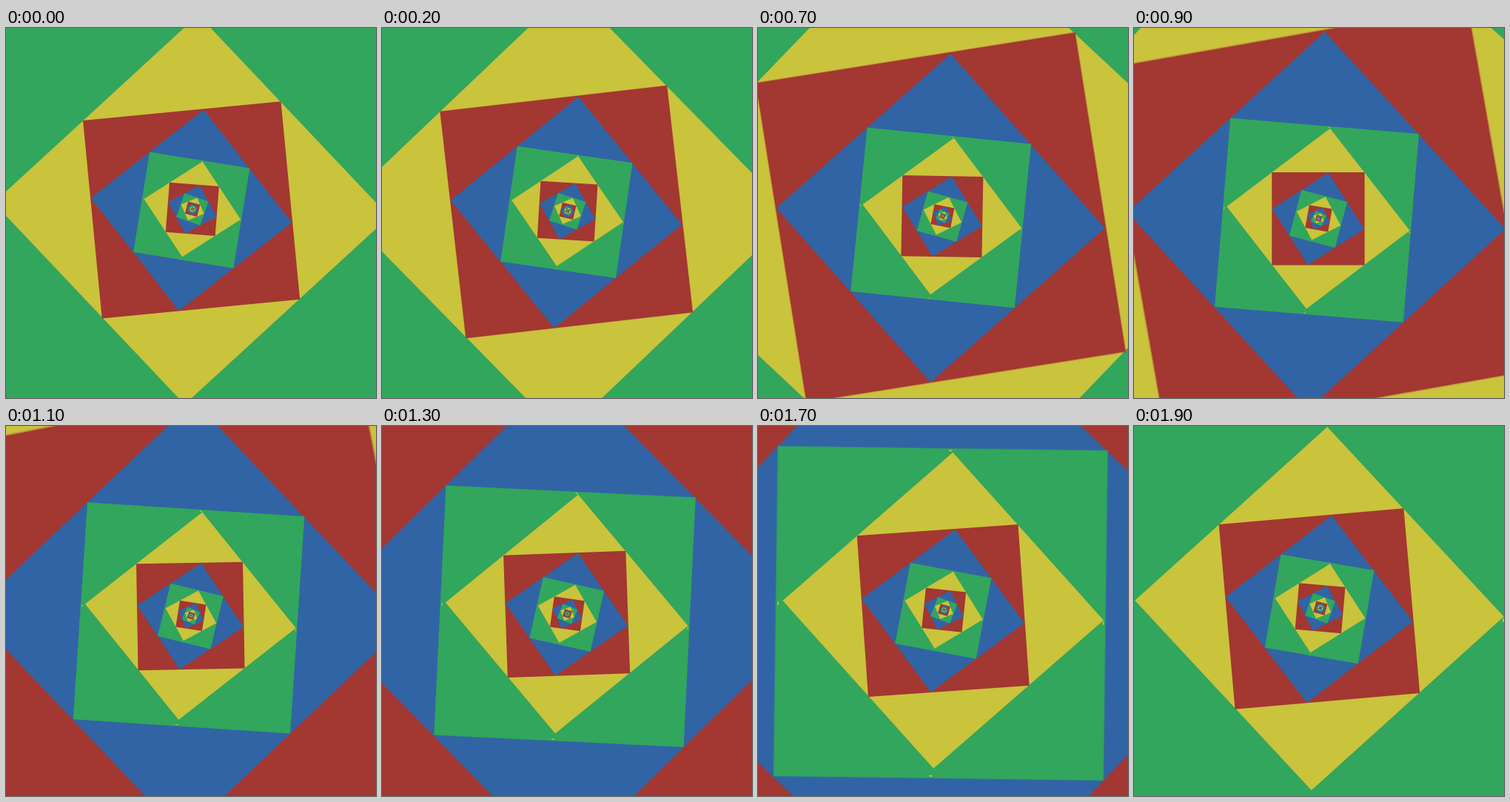
These frames come from a looping animation (500x500 px, 2000 ms). An HTML page with a canvas:

```html
<!DOCTYPE html>
<html lang="en">
<head>
<meta charset="utf-8">
<title>Nested squares</title>
<style>
  html, body { margin: 0; width: 100%; height: 100%; overflow: hidden; background: #32a65c; }
  canvas { display: block; width: 500px; height: 500px; }
</style>
</head>
<body>
<canvas id="stage" width="500" height="500"></canvas>
<script>
const ctx = document.getElementById('stage').getContext('2d');
const STEP_MS = 100, STEPS = 20;
const ZOOM = 4, TURN = -10; // per loop
const YELLOW = '#cac33c';

// Half diagonals, direction of the upper corner, and offset from the zoom point.
const squares = [
  { color: '#32a65c', a: 96.9, b: 96.9, angle: -35.75, x: -1.45, y: 1.4, soft: true, tips: true },
  { color: YELLOW, a: 65.85, b: 66.85, angle: -78, x: -0.4, y: 0.2 },
  { color: '#a33732', a: 47.5, b: 47.5, angle: -40.5, x: -0.4, y: 0.27, soft: true },
  { color: '#3164a5', a: 34.2, b: 34.2, angle: -73, x: -0.42, y: 0.42, soft: true }
];

// Drift of the zoom point: step, x, y.
const drift = [
  [0, 252.2, 244.7], [5, 249.3, 251.1], [9, 249.7, 257.2],
  [10, 249.9, 257.6], [20, 252.2, 244.7]
];

const rad = deg => deg * Math.PI / 180;

function zoomPoint(step) {
  const i = drift.findIndex(key => key[0] > step);
  const [s0, x0, y0] = drift[i - 1], [s1, x1, y1] = drift[i];
  const k = (step - s0) / (s1 - s0);
  return [x0 + (x1 - x0) * k, y0 + (y1 - y0) * k];
}

function drawTips(scale, turn) {
  for (let i = 0; i < 4; i++) {
    ctx.save();
    ctx.rotate(rad(-78 + turn + i * 90));
    ctx.fillStyle = YELLOW;
    ctx.fillRect(67.5 * scale, -0.7 * scale, 0.5 * scale, 1.4 * scale);
    ctx.restore();
  }
}

function drawSquare(square, scale, turn, cx, cy) {
  const a = square.a * scale, b = square.b * scale;
  ctx.save();
  ctx.translate(cx + square.x * scale, cy + square.y * scale);
  ctx.save();
  ctx.rotate(rad(square.angle + turn));
  ctx.beginPath();
  ctx.moveTo(a, 0);
  ctx.lineTo(0, b);
  ctx.lineTo(-a, 0);
  ctx.lineTo(0, -b);
  ctx.closePath();
  ctx.fillStyle = square.color;
  ctx.fill();
  // Large squares have a slightly soft edge.
  if (square.soft && a > 190) {
    ctx.globalAlpha = 0.35;
    ctx.strokeStyle = square.color;
    ctx.lineWidth = (a - 180) / 60;
    ctx.stroke();
  }
  ctx.restore();
  if (square.tips) drawTips(scale, turn);
  ctx.restore();
}

function draw(step) {
  const progress = step / STEPS;
  const [cx, cy] = zoomPoint(step);
  for (let level = 2; level > -4; level--) {
    const depth = level + progress;
    for (const square of squares) {
      drawSquare(square, ZOOM ** depth, TURN * depth, cx, cy);
    }
  }
}

const start = performance.now();
function tick() {
  const elapsed = performance.now() - start;
  draw(Math.floor(elapsed / STEP_MS) % STEPS);
  requestAnimationFrame(tick);
}
tick();
</script>
</body>
</html>
```
